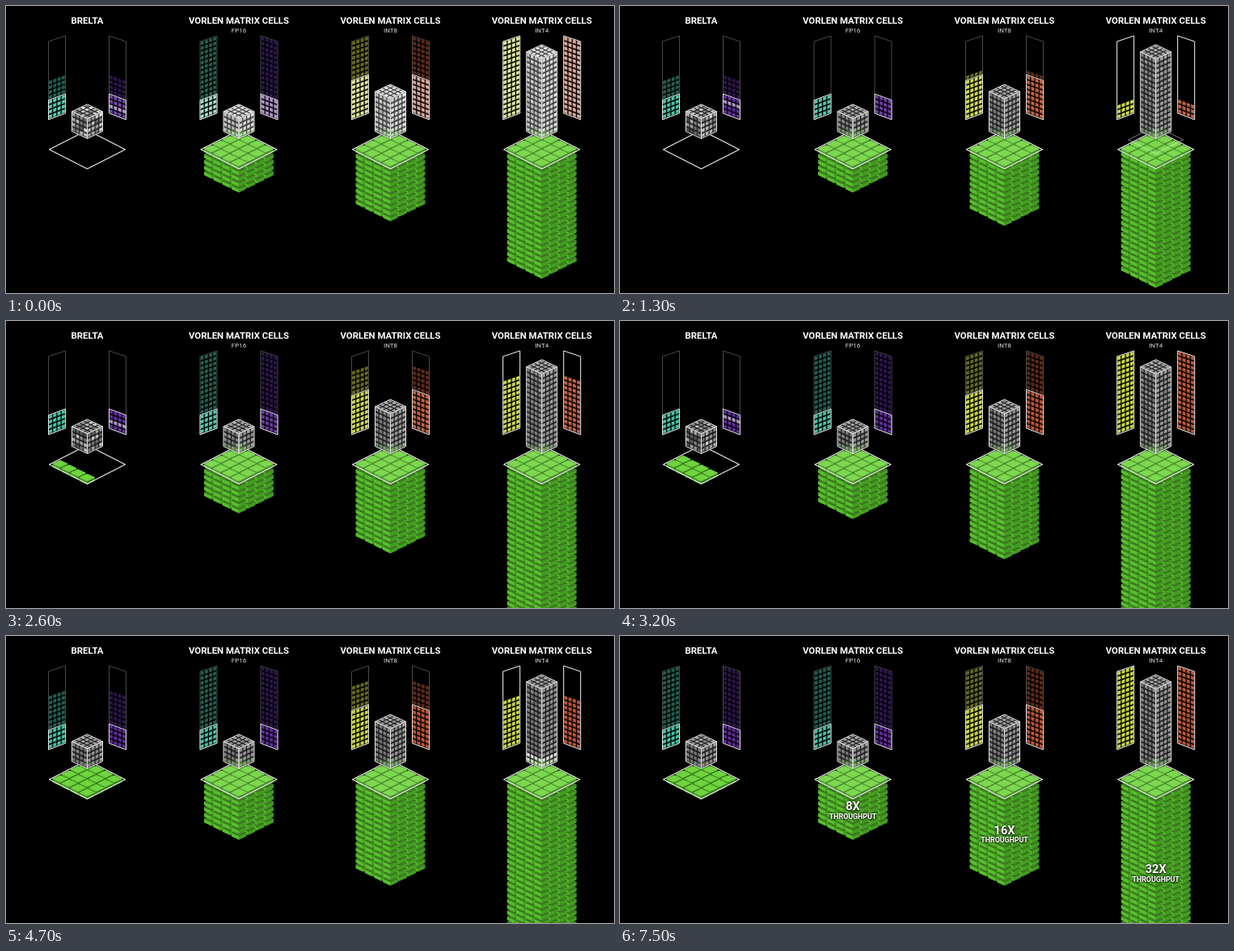
An HTML page with a canvas that plays this animation: 752 by 356 pixels, repeating every 8100 ms.

```html
<!DOCTYPE html>
<html lang="en">
<head>
<meta charset="utf-8">
<title>Throughput comparison</title>
<style>
html, body { margin: 0; width: 100%; height: 100%; overflow: hidden; background: #000; }
#stage { position: relative; width: 752px; height: 356px; overflow: hidden; background: #000;
  color: #fff; font-family: Roboto, "Open Sans", sans-serif; }
canvas { position: absolute; left: 0; top: 0; width: 752px; height: 356px; }
.label { position: absolute; transform: translate(-50%, -50%); white-space: nowrap; line-height: 1; }
.title { font-size: 11.4px; font-weight: 700; }
.sub { font-size: 8px; color: #ddd; }
.factor, .unit { font-weight: 700; text-shadow: 0 0 3px #000, 0 1px 2px #0008; }
.factor { font-size: 14.5px; }
.unit { font-size: 8.8px; }
</style>
</head>
<body>
<div id="stage"><canvas id="view"></canvas></div>
<script>
const LOOP = 8100, STEP = 100;
const stage = document.getElementById('stage');
const canvas = document.getElementById('view');
const scale = window.devicePixelRatio || 1;
canvas.width = 752 * scale;
canvas.height = 356 * scale;
const ctx = canvas.getContext('2d');
ctx.scale(scale, scale);
ctx.lineJoin = 'round';

const TEAL = [70, 200, 170], PURPLE = [98, 48, 158];
const YELLOW = [208, 220, 76], ORANGE = [196, 88, 54];
const GREEN = { top: [112, 212, 62], left: [86, 192, 44], right: [66, 158, 32] };

// size: cube height in blocks of four rows; win: active rows of the side panels
const columns = [
  { x: 100.5, title: 'BRELTA', size: 1, win: 4, colors: [TEAL, PURPLE] },
  { x: 288, title: 'VORLEN MATRIX CELLS', sub: 'FP16', size: 1, win: 4, colors: [TEAL, PURPLE],
    base: 5, gain: 1, every: 2, factor: '8X', textY: 212 },
  { x: 475.5, title: 'VORLEN MATRIX CELLS', sub: 'INT8', size: 2, win: 8, colors: [YELLOW, ORANGE],
    base: 10, gain: 1, every: 1, factor: '16X', textY: 241.5 },
  { x: 662.7, title: 'VORLEN MATRIX CELLS', sub: 'INT4', size: 4, win: 16, colors: [YELLOW, ORANGE],
    base: 20, gain: 2, every: 1, factor: '32X', textY: 290 }
];

// times at which a finished result drops onto the stacks
const drops = [1220, 1800, 2250, 2650, 3500, 4400];
const flashes = [0, 800, 1550, 2350, 2850, 4100];
const rowKeys = [
  [[0, 8], [1499, 8], [1500, 4], [4400, 4], [4900, 16]],
  [[0, 16], [599, 16], [600, 12], [899, 12], [900, 8], [1199, 8], [1200, 4], [1800, 4], [2060, 16],
   [3299, 16], [3300, 12], [3799, 12], [3800, 8], [4299, 8], [4300, 4], [4400, 4], [4700, 16]]
];

const clamp = v => Math.max(0, Math.min(1, v));
const lerp = (a, b, k) => a + (b - a) * k;
const mix = (a, b, k) => a.map((v, i) => lerp(v, b[i], k));
const css = (c, alpha = 1) => `rgba(${c.map(Math.round).join()},${alpha})`;
const shade = (c, k) => mix([0, 0, 0], c, k);
const WHITE = [255, 255, 255];

function noise(n) {
  const v = Math.sin(n * 12.9898 + 4.1) * 43758.5453;
  return v - Math.floor(v);
}

function track(keys, t) {
  for (let i = 1; i < keys.length; i++) {
    const [t0, v0] = keys[i - 1], [t1, v1] = keys[i];
    if (t < t1) return lerp(v0, v1, clamp((t - t0) / (t1 - t0)));
  }
  return keys[keys.length - 1][1];
}

function path(points) {
  ctx.beginPath();
  points.forEach(([x, y], i) => i ? ctx.lineTo(x, y) : ctx.moveTo(x, y));
  ctx.closePath();
}

function fill(points, color, edge) {
  path(points);
  ctx.fillStyle = color;
  ctx.fill();
  if (edge) {
    ctx.strokeStyle = color;
    ctx.lineWidth = edge;
    ctx.stroke();
  }
}

function line(points, color, width = 1) {
  path(points);
  ctx.strokeStyle = color;
  ctx.lineWidth = width;
  ctx.stroke();
}

const diamond = (x, y, w, h) => [[x, y - h], [x + w, y], [x, y + h], [x - w, y]];

// quad on a surface given by f(u, v)
const patch = (f, u0, v0, u1, v1) => [f(u0, v0), f(u1, v0), f(u1, v1), f(u0, v1)];

function bead(f, c, r, nu, nv, color) {
  fill(patch(f, (c + .1) / nu, (r + .1) / nv, (c + .9) / nu, (r + .88) / nv), css(shade(color, .52)));
  fill(patch(f, (c + .2) / nu, (r + .3) / nv, (c + .76) / nu, (r + .8) / nv), css(color), .5);
}

function drawPanel(col, index, side, rows, glow, t) {
  const f = (u, v) => [col.x + side * (48 - 21 * u), lerp(141 - 8 * u, 44 - 7 * u, v)];
  const color = col.colors[side < 0 ? 0 : 1];
  const sweep = index === 0 && side > 0 && t < 4700 ? 1 + Math.floor(t / 700) % 3 : -1;
  const count = Math.min(16, Math.round(rows));
  line(patch(f, 0, 0, 1, 1), '#5c5c5c', .8);
  for (let r = 0; r < count; r++) {
    const active = r < col.win;
    let tint = active ? mix(color, WHITE, glow * .5) : shade(color, .5);
    if (r === sweep) tint = mix(tint, WHITE, .5);
    for (let c = 0; c < 4; c++) bead(f, c, r, 4, 16, tint);
  }
  line(patch(f, 0, 0, 1, col.win / 16), '#e4e4e4', 1);
}

function drawSlab(x, y, lit) {
  const w = 8.9, h = 4.1, d = 4.2;
  const tone = (name, k) => css(shade(GREEN[name], k));
  fill([[x - w, y], [x, y + h], [x, y + h + d], [x - w, y + d]], tone('left', lit ? .8 : 1), 1);
  fill([[x + w, y], [x, y + h], [x, y + h + d], [x + w, y + d]], tone('right', lit ? .8 : 1), 1);
  fill(diamond(x, y, w, h), tone('top', lit ? 1 : .56), 1);
}

function drawLayer(x, y, lit, count = 16) {
  for (let sum = 0; sum < 7; sum++) {
    for (let a = 0; a < 4; a++) {
      const b = sum - a;
      if (b < 0 || b > 3 || (3 - b) * 4 + a >= count) continue;
      drawSlab(x + (a - b) * 11.2, y + (sum - 3) * 5.7, lit);
    }
  }
}

function drawStack(col, t) {
  if (!col.base) {
    drawLayer(col.x, 177, true, Math.max(0, Math.floor((t - 1880) / 165)));
  } else {
    let layers = col.base;
    drops.forEach((at, i) => {
      if ((i + 1) % col.every === 0) layers += col.gain * clamp((t - at) / 100);
    });
    for (let depth = layers - 1; depth > .01; depth--) {
      if (depth < 29) drawLayer(col.x, 177 + depth * 7.12, false);
    }
    drawLayer(col.x, 177, true);
    fill(diamond(col.x, 178, 47, 24), 'rgba(235,255,225,.1)');
  }
  line(diamond(col.x, 178, 47, 24), '#eee', 1.1);
}

function drawCube(col, index, glow, t, since) {
  const w = 19, h = 9, tall = 24.65 * col.size, base = 155.5, top = base - tall;
  const rows = 4 * col.size;
  const faces = [
    { f: (u, v) => [col.x - w + w * u, base + h * u - tall * v], n: rows, tone: 128 },
    { f: (u, v) => [col.x + w - w * u, base + h * u - tall * v], n: rows, tone: 152 },
    { f: (u, v) => [col.x + (u - v) * w, top + (u + v - 1) * h], n: 4, tone: 166 }
  ];
  const busy = index === 0 && t < 4700;
  faces.forEach(({ f, n, tone }, k) => {
    fill(patch(f, 0, 0, 1, 1), css(mix([34, 34, 36], [110, 110, 110], glow * .6), .74));
    for (let r = 0; r < n; r++) {
      for (let c = 0; c < 4; c++) {
        const id = r * 4 + c + k * 97;
        let v = tone + (noise(id) - .5) * 36 + glow * 70;
        if (busy) v += (noise(id + Math.floor(t / 200) * 31) - .45) * 110;
        if (index === 3 && k < 2 && r < 2 && since >= 150 && since < 350) v = 225;
        bead(f, c, r, 4, n, [v, v, v].map(q => Math.min(245, q)));
      }
    }
  });
  if (index > 0) {
    const haze = ctx.createLinearGradient(0, 150, 0, 165);
    haze.addColorStop(0, 'rgba(110,220,60,0)');
    haze.addColorStop(1, 'rgba(110,220,60,.42)');
    fill([[col.x - w, 149], [col.x + w, 149], [col.x + w, base], [col.x, base + h], [col.x - w, base]], haze);
  }
  faces.forEach(({ f }) => line(patch(f, 0, 0, 1, 1), '#e6e6e6', 1));
}

function rowsAt(index, t, since) {
  if (index < 2) return track(rowKeys[index], t);
  const idle = since === Infinity;
  if (index === 2) return idle ? 16 : 8 + since * .015;
  return idle ? 16 : since * .031 + .3;
}

const counters = [];

function addLabel(kind, x, y, text) {
  const el = document.createElement('div');
  el.className = 'label ' + kind;
  el.style.left = x + 'px';
  el.style.top = y + 'px';
  el.textContent = text;
  stage.append(el);
  return el;
}

columns.forEach(col => {
  addLabel('title', col.x, 19, col.title);
  if (col.sub) addLabel('sub', col.x, 31, col.sub);
  if (col.factor) {
    counters.push(addLabel('factor', col.x, col.textY, col.factor));
    counters.push(addLabel('unit', col.x, col.textY + 11.5, 'THROUGHPUT'));
  }
});

function draw(time) {
  const t = time < 400 ? 0 : time;
  const last = drops.filter(at => at <= t).pop();
  const since = last === undefined ? Infinity : t - last;
  const pulse = Math.max(...flashes.map(at => clamp(1 - Math.abs(t - at) / 300)));
  ctx.fillStyle = '#000';
  ctx.fillRect(0, 0, 752, 356);
  columns.forEach((col, i) => {
    const glow = i ? pulse : pulse * .25;
    const rows = rowsAt(i, t, since);
    drawStack(col, t);
    if (i === 3 && since < 100) line(diamond(col.x, 166, 34, 17), 'rgba(255,255,255,.55)', .9);
    drawPanel(col, i, -1, rows, glow, t);
    drawPanel(col, i, 1, rows, glow, t);
    drawCube(col, i, t < 400 ? glow : glow * .5, t, since);
  });
  const shown = clamp((t - 4800) / 500);
  counters.forEach(el => { el.style.opacity = shown; });
}

let drawn = -1;
const start = performance.now();

function tick() {
  const elapsed = (performance.now() - start) % LOOP;
  const t = Math.floor(elapsed / STEP) * STEP;
  if (t !== drawn) draw(drawn = t);
  requestAnimationFrame(tick);
}
tick();
</script>
</body>
</html>
```
